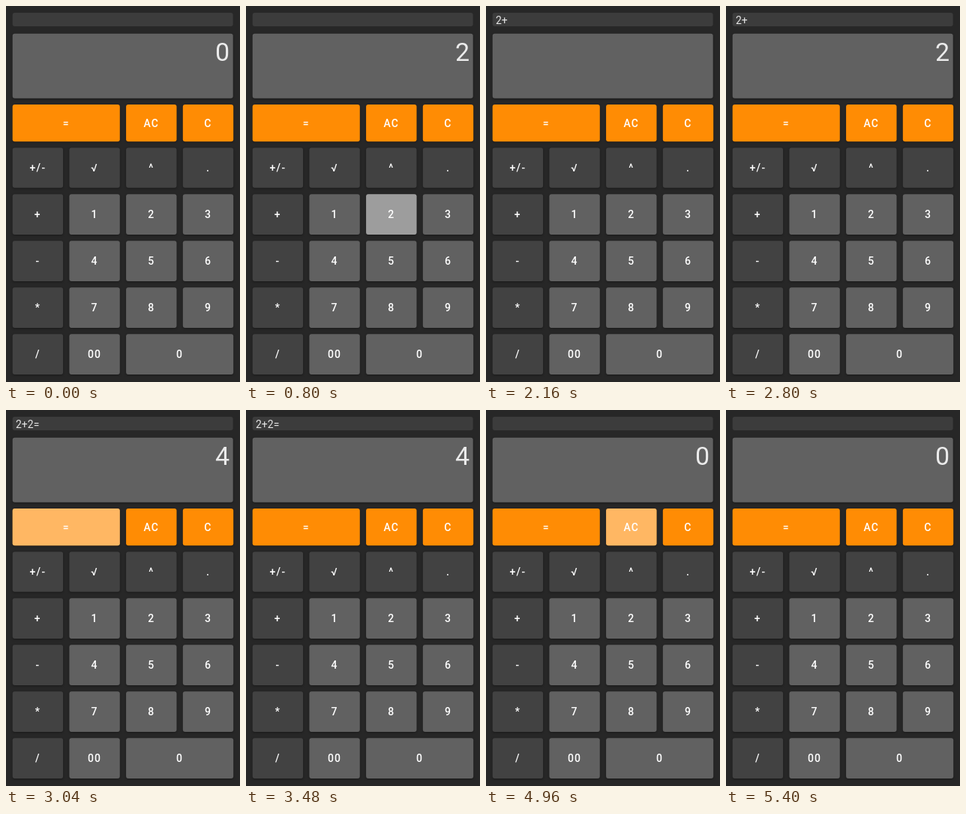
An HTML page that plays this animation: 312 px wide and 500 px high, repeating every 5680 ms.

```html
<!DOCTYPE html>
<html lang="en">
<head>
<meta charset="utf-8">
<title>Calculator</title>
<style>
  html, body { margin: 0; width: 100%; height: 100%; overflow: hidden; background: #272727; }
  svg { display: block; width: 312px; height: 500px; font-family: Roboto, Arial, sans-serif; }
  .key { filter: drop-shadow(0 1px 1.5px rgba(0, 0, 0, .35)); }
  .label { font-size: 14px; font-weight: 500; letter-spacing: 1.25px; text-anchor: middle; fill: #fff; }
  #history { font-size: 14px; fill: #e4e4e4; }
  #display { font-size: 34px; text-anchor: end; fill: #ebebeb; }
</style>
</head>
<body>
<svg id="stage" viewBox="0 0 312 500">
  <rect width="312" height="500" fill="#272727"/>
  <rect x="8.7" y="9" width="294" height="18" rx="3" fill="#3c3c3c"/>
  <rect class="key" x="8.7" y="36.7" width="294" height="86" rx="3" fill="#616161"/>
  <text id="history" x="13" y="23.5"></text>
  <text id="display" x="298" y="73"></text>
</svg>
<script>
const LOOP = 5680, STEP = 40;
const ORANGE = '#ff8c04', DARK = '#424242', GREY = '#616161';
const COLUMN = 75.7, WIDTH = 67.4;
const stage = document.getElementById('stage');
const historyText = document.getElementById('history');
const displayText = document.getElementById('display');
const keys = {};

function add(parent, name, attributes) {
  const node = document.createElementNS('http://www.w3.org/2000/svg', name);
  for (const key in attributes) node.setAttribute(key, attributes[key]);
  return parent.appendChild(node);
}

function addKey(label, column, span, y, height, fill) {
  const width = WIDTH + (span - 1) * COLUMN;
  const x = 8.7 + column * COLUMN;
  const box = { x, y, width, height, rx: 3 };
  const cx = x + width / 2, cy = y + height / 2;
  const id = 'clip' + Object.keys(keys).length;
  add(add(stage, 'clipPath', { id }), 'rect', box);
  add(stage, 'rect', { ...box, fill, class: 'key' });
  const glow = add(stage, 'rect', { ...box, fill: '#fff', opacity: 0 });
  const ripple = add(stage, 'circle', { cx, cy, r: 0, fill: '#fff', opacity: 0, 'clip-path': `url(#${id})` });
  add(stage, 'text', { x: cx, y: cy + 5, class: 'label' }).textContent = label;
  keys[label] = { glow, ripple, radius: Math.hypot(width, height) / 2 };
}

// Each row: top, height, then [label, span, colour] entries.
const rows = [
  [131, 49.3, ['=', 2, ORANGE], ['AC', 1, ORANGE], ['C', 1, ORANGE]],
  [188.5, 53.3, ['+/-', 1, DARK], ['√', 1, DARK], ['^', 1, DARK], ['.', 1, DARK]],
  [250.3, 53.7, ['+', 1, DARK], ['1', 1, GREY], ['2', 1, GREY], ['3', 1, GREY]],
  [312.3, 53.7, ['-', 1, DARK], ['4', 1, GREY], ['5', 1, GREY], ['6', 1, GREY]],
  [374.2, 53.7, ['*', 1, DARK], ['7', 1, GREY], ['8', 1, GREY], ['9', 1, GREY]],
  [436.2, 53.7, ['/', 1, DARK], ['00', 1, GREY], ['0', 2, GREY]]
];
for (const [y, height, ...entries] of rows) {
  let column = 0;
  for (const [label, span, fill] of entries) {
    addKey(label, column, span, y, height, fill);
    column += span;
  }
}

const CLICK = 160;
const presses = [
  { at: 600, key: '2', history: '', display: '2' },
  { at: 1360, key: '+', history: '2+', display: '' },
  { at: 2180, key: '2', history: '2+', display: '2' },
  { at: 2820, key: '=', history: '2+2=', display: '4' },
  { at: 4740, key: 'AC', history: '', display: '0' }
];

const clamp = v => Math.min(1, Math.max(0, v));
const easeOut = v => 1 - (1 - v) ** 3;

function render(time) {
  const t = Math.floor((time % LOOP) / STEP) * STEP;
  let history = '', display = '0';
  for (const key of Object.values(keys)) {
    key.glow.setAttribute('opacity', 0);
    key.ripple.setAttribute('opacity', 0);
  }
  for (const press of presses) {
    const age = t - press.at;
    if (age >= CLICK) ({ history, display } = press);
    if (age < 0 || age >= 620) continue;
    const { glow, ripple, radius } = keys[press.key];
    const fade = 1 - easeOut(clamp((age - 340) / 280));
    glow.setAttribute('opacity', 0.17 * clamp(age / 160) * fade);
    ripple.setAttribute('r', radius * (0.3 + 0.7 * easeOut(clamp(age / 200))));
    ripple.setAttribute('opacity', 0.25 * clamp(age / 100) * fade);
  }
  historyText.textContent = history;
  displayText.textContent = display;
}

const start = performance.now();
function frame() {
  render(performance.now() - start);
  requestAnimationFrame(frame);
}
frame();
</script>
</body>
</html>
```
